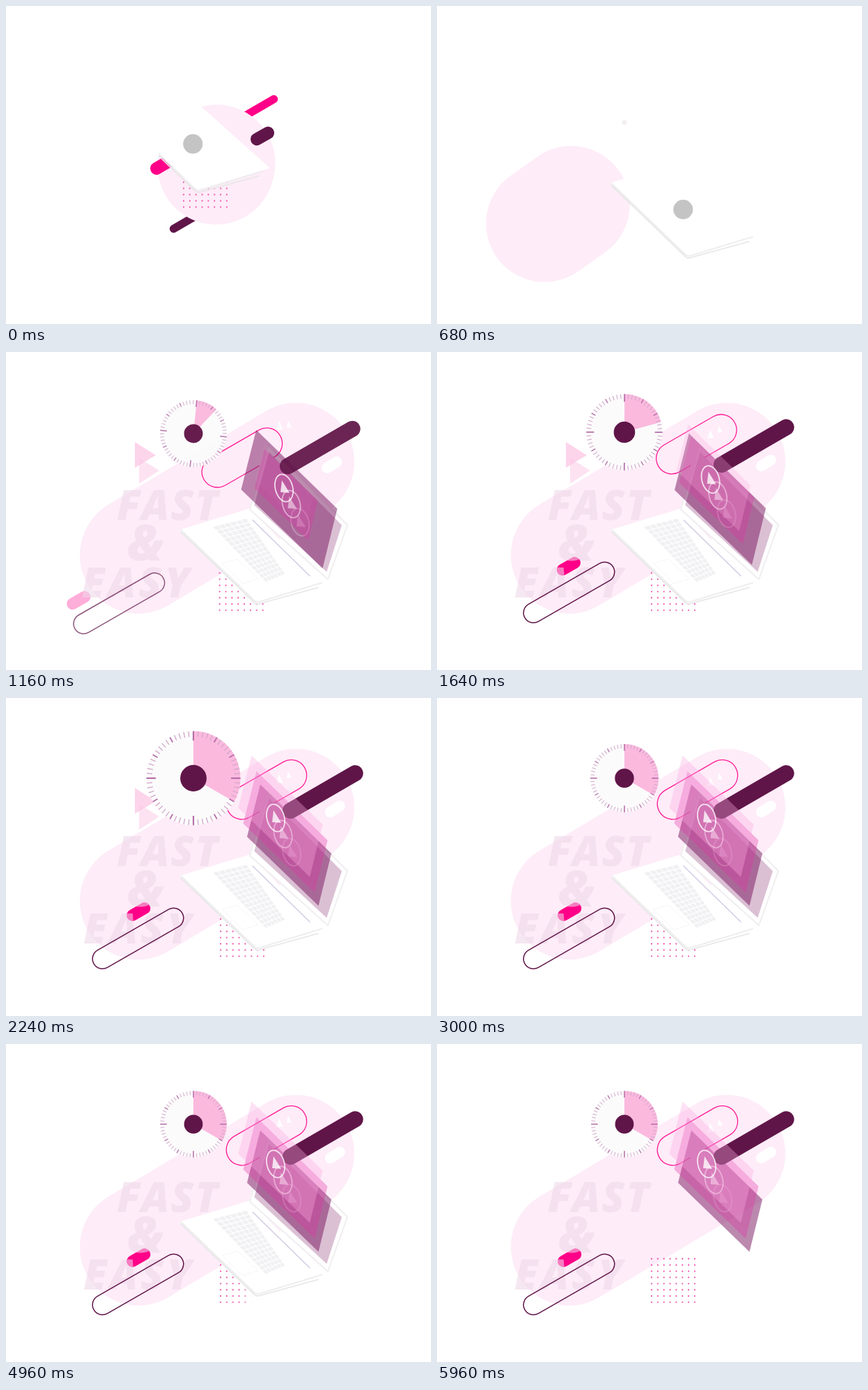
Recreate the animation shown at these times as an HTML page with a canvas. Size 610 by 456 pixels, loop 6000 ms.

```html
<!DOCTYPE html>
<html lang="en">
<head>
<meta charset="utf-8">
<title>Fast &amp; Easy</title>
<style>
  html, body { margin: 0; width: 100%; height: 100%; overflow: hidden; background: #fff; }
  canvas { display: block; width: 610px; height: 456px; }
</style>
</head>
<body>
<canvas id="stage"></canvas>
<script>
const LOOP = 6000, W = 610, H = 456;
const PALE = '#feecf8', PINK = '#ff0088', PLUM = '#601548';
const canvas = document.getElementById('stage');
const ctx = canvas.getContext('2d');
const dpr = window.devicePixelRatio || 1;
canvas.width = W * dpr;
canvas.height = H * dpr;

const clamp = x => Math.max(0, Math.min(1, x));
const mix = (a, b, u) => a + (b - a) * u;
const mixPt = (p, q, u) => [mix(p[0], q[0], u), mix(p[1], q[1], u)];
const span = (t, a, b) => clamp((t - a) / (b - a));
const easeOut = u => 1 - (1 - u) ** 3;
const easeInOut = u => u < .5 ? 4 * u ** 3 : 1 - (2 - 2 * u) ** 3 / 2;
const smooth = u => u * u * (3 - 2 * u);

// Smooth value through [time, value] stops
function track(t, stops) {
  if (t <= stops[0][0]) return stops[0][1];
  for (let i = 1; i < stops.length; i++) {
    const [a, from] = stops[i - 1], [b, to] = stops[i];
    if (t <= b) return mix(from, to, smooth(span(t, a, b)));
  }
  return stops[stops.length - 1][1];
}

// Draws with its own opacity and offset
function group(alpha, dx, dy, draw) {
  if (alpha <= 0) return;
  ctx.save();
  ctx.globalAlpha *= alpha;
  ctx.translate(dx, dy);
  draw();
  ctx.restore();
}

// Group shifted along the 30 degree axis; positive is down and left
const slide = (alpha, d, draw) => group(alpha, -d, d * .577, draw);

function bar(p, q, r, color) {
  ctx.lineCap = 'round';
  ctx.lineWidth = 2 * r;
  ctx.strokeStyle = color;
  ctx.beginPath();
  ctx.moveTo(...p);
  ctx.lineTo(...q);
  ctx.stroke();
}

function capsule(p, q, r, color, width) {
  const a = Math.atan2(q[1] - p[1], q[0] - p[0]);
  ctx.beginPath();
  ctx.arc(...p, r, a + Math.PI / 2, a - Math.PI / 2);
  ctx.arc(...q, r, a - Math.PI / 2, a + Math.PI / 2);
  ctx.closePath();
  ctx.strokeStyle = color;
  ctx.lineWidth = width;
  ctx.stroke();
}

function poly(points, fill, stroke, width = 1) {
  ctx.beginPath();
  points.forEach(p => ctx.lineTo(...p));
  ctx.closePath();
  if (fill) { ctx.fillStyle = fill; ctx.fill(); }
  if (stroke) {
    ctx.lineJoin = 'round';
    ctx.strokeStyle = stroke;
    ctx.lineWidth = width;
    ctx.stroke();
  }
}

function disc(x, y, r, color) {
  ctx.fillStyle = color;
  ctx.beginPath();
  ctx.arc(x, y, r, 0, 2 * Math.PI);
  ctx.fill();
}

function dots(alphaAt) {
  for (let row = 0; row < 8; row++)
    for (let col = 0; col < 8; col++)
      group(alphaAt(col, row), 0, 0, () =>
        disc(308 + col * 8.85, 308 + row * 8.9, 1.15, '#f05cae'));
}

function base() {
  const corners = [[251, 256], [350, 226], [453, 335], [360, 360]];
  poly(corners, '#fff', '#fff', 3);
  edge();
  const keyAt = (u, v) => mixPt(mixPt([345, 239], [401, 319], u), mixPt([296, 251], [373, 331], u), v);
  for (let r = 0; r < 6; r++)
    for (let c = 0; c < 14; c++) {
      const u = c / 14, v = r / 6, du = .058, dv = .14;
      poly([keyAt(u, v), keyAt(u + du, v), keyAt(u + du, v + dv), keyAt(u, v + dv)], '#f1f0f2');
    }
  poly([[310, 303], [332, 297], [362, 325], [340, 332]], null, '#f6f6f6');
  bar([354, 241], [436, 321], .6, '#cfc6e2');
}

function edge() {
  ctx.lineCap = ctx.lineJoin = 'round';
  for (const [y, color, w] of [[0, '#eeeeee', 2], [2.8, '#e6e6e6', 1.6]]) {
    ctx.strokeStyle = color;
    ctx.lineWidth = w;
    ctx.beginPath();
    ctx.moveTo(251, 255 + y);
    ctx.lineTo(356, 356 + y);
    ctx.quadraticCurveTo(360, 360 + y, 366, 357.5 + y);
    ctx.lineTo(y ? 448 : 453, y ? 335 + y : 331);
    ctx.stroke();
  }
}

// Lid swings about the hinge; open runs from 0 to 1
function lid(open) {
  const a = open * Math.PI / 2, c = Math.cos(a), s = Math.sin(a);
  const swing = ([x, y], [cx, cy], [ox, oy]) => [x + c * cx + s * ox, y + c * cy + s * oy];
  const far = swing([350, 226], [-99, 28], [26, -93]);
  const near = swing([460, 328], [-100, 29], [30, -80]);
  poly([[350, 226], far, near, [462, 326]], '#fff', '#fff', 2);
  if (open > 0) poly([[350, 226], far, near, [462, 326]], null, '#f0eef0', 2);
  if (open < .6) {
    const mid = mixPt(mixPt([350, 226], [460, 328], .5), mixPt(far, near, .5), .52);
    group(1 - open / .6, 0, 0, () => disc(mid[0], mid[1], 14, '#c4c4c4'));
  } else {
    const at = (u, v) => mixPt(mixPt([353, 222], [461, 321], u), mixPt(far, near, u), v);
    group(span(open, .6, 1), 0, 0, () =>
      poly([at(.02, .05), at(.98, .05), at(.95, .92), at(.03, .92)], 'rgba(150,70,130,.34)'));
  }
}

function clock(x, y, r, turn, sweep) {
  ctx.save();
  ctx.translate(x, y);
  ctx.rotate(turn);
  disc(0, 0, r, '#fbfbfb');
  ctx.fillStyle = '#fbb9de';
  ctx.beginPath();
  ctx.moveTo(0, 0);
  ctx.arc(0, 0, r, -Math.PI / 2, -Math.PI / 2 + sweep);
  ctx.fill();
  ctx.lineCap = 'butt';
  for (let i = 0; i < 60; i++) {
    const quarter = i % 15 === 0, five = i % 5 === 0;
    ctx.strokeStyle = five ? '#b56ea8' : '#d3a9cc';
    ctx.lineWidth = r * (quarter ? .032 : five ? .026 : .02);
    ctx.beginPath();
    ctx.moveTo(0, -r);
    ctx.lineTo(0, -r * (quarter ? .8 : .88));
    ctx.stroke();
    ctx.rotate(Math.PI / 30);
  }
  disc(0, 0, r * .28, PLUM);
  ctx.restore();
}

// Skewed pane around its centre
function pane(x, y, scale, alpha, color) {
  group(alpha, x, y, () => {
    ctx.scale(scale, scale);
    poly([[-60.5, -12], [-41.5, -87], [60.5, 12], [42, 87]], color);
  });
}

function playIcon(x, y, alpha) {
  group(alpha, x, y, () => {
    ctx.strokeStyle = '#fff';
    ctx.lineWidth = 1.8;
    ctx.beginPath();
    ctx.ellipse(0, 0, 12.5, 20, -.25, 0, 2 * Math.PI);
    ctx.stroke();
    poly([[-3, -11], [8, 7], [-5, 6]], '#fff');
  });
}

function words(t) {
  const alpha = span(t, 780, 1080);
  group(alpha, 0, 0, () => {
    ctx.fillStyle = 'rgba(238,215,232,.58)';
    const line = (text, x, y, size, spacing) => {
      ctx.font = `italic 800 ${size}px "Open Sans", "Noto Sans", sans-serif`;
      ctx.letterSpacing = spacing + 'px';
      ctx.fillText(text, x, y);
    };
    line('FAST', 159, 241, 60, 2);
    line('&', 175, 299, 70, 0);
    line('EASY', 111 - 6 * (1 - easeOut(span(t, 1000, 1700))), 352, 60, 4);
  });
}

function intro(t) {
  const u = easeInOut(span(t, 0, 560));
  const away = 193 * u, alpha = 1 - span(t, 300, 540);
  slide(alpha, away, () => {
    bar([325, 168], [384.5, 133.5], 5.7, PINK);
    bar([240.5, 319.5], [275, 299.5], 5.7, PLUM);
  });
  bar(mixPt([301.5, 229.5], [149, 315], u), mixPt([302.5, 225.5], [159, 304], u), 84, PALE);
  slide(alpha, away, () => {
    bar([360, 191], [376, 182], 9, PLUM);
    bar([216, 233], [240, 219], 9, PINK);
  });
  group(1 - span(t, 250, 540), mix(-53, 0, u), mix(-82, 0, u), () => dots(() => 1));
  group(1, mix(-85, 0, u), mix(-94, 0, u), () => {
    ctx.beginPath();
    ctx.rect(mix(304, 248, u), 0, W, H);
    ctx.clip();
    lid(0);
    edge();
  });
}

function dotAlpha(t, col, row) {
  const gone = span(t, 3380 + 150 * row, 3560 + 150 * row);
  const back = span(t, 4400 + 110 * col, 4560 + 110 * col);
  return span(t, 850, 1100) * Math.max(1 - gone, back);
}

function pinkOutline(t) {
  ctx.save();
  ctx.beginPath();
  ctx.rect(0, 0, W, H);
  ctx.rect(364, 147, 20, 20);
  ctx.clip('evenodd');
  slide(span(t, 720, 1050), 150 * (1 - easeOut(span(t, 700, 1900))), () =>
    capsule([338.5, 151.7], [409.3, 111], 22.3, '#ff1a96', 1.3));
  ctx.restore();
}

function main(t) {
  const grow = easeOut(span(t, 660, 1120));
  bar(mixPt([149, 315], [190, 291], grow), mixPt([159, 304], [416, 157], grow), 84, PALE);

  group(span(t, 850, 1120) * (1 - span(t, 2580, 3000)), 0, 0, () => {
    poly([[185, 129], [215, 148], [185, 166]], 'rgba(252,185,222,.6)');
    poly([[191, 152], [220, 170], [191, 189]], 'rgba(252,200,230,.5)');
  });

  slide(track(t, [[1000, 0], [1180, .33], [1600, 1]]), 240 * (1 - easeOut(span(t, 900, 1800))), () =>
    bar([181.5, 311.5], [199, 301.5], 8.4, PINK));
  words(t);
  slide(span(t, 680, 760) * track(t, [[1100, .7], [1500, 1]]), 250 * (1 - easeOut(span(t, 680, 1600))), () =>
    capsule([138.5, 374], [240.5, 315.5], 14.3, PLUM, 1.5));

  group(1, -2 * (1 - span(t, 1000, 1500)), 0, () => dots((c, r) => dotAlpha(t, c, r)));

  if (t < 5960) {
    const open = smooth(span(t, 690, 1080));
    if (open > 0) base();
    lid(open);
    if (open < .5) edge();
  }

  slide(span(t, 850, 1050), 60 * (1 - easeOut(span(t, 700, 1500))), () =>
    bar([465.5, 163.5], [479, 155], 7.8, '#fff'));
  const bob = track(t, [[1100, -15], [1700, -2], [2240, -4], [3000, 0], [3920, -7], [4500, -14], [5200, -4], [5760, 0]]);
  group(span(t, 900, 1100) * .9, 0, 0, () => {
    poly([[392, 113 + bob], [397.5, 125.5 + bob], [388, 126.5 + bob]], '#fff');
    poly([[405, 107 + bob * .6], [410, 117 + bob * .6], [402.5, 117 + bob * .6]], '#fff');
  });

  pinkOutline(t);

  const rise = easeOut(span(t, 660, 1160));
  const r = track(t, [[660, 12], [1130, 48], [1280, 48], [2200, 67.5], [2560, 67.5], [3000, 49], [3200, 47.8]]);
  group(span(t, 640, 1180), 0, 0, () => clock(
    269, mix(174, 117, rise) - 2 * span(t, 1160, 1500), r,
    track(t, [[680, .5], [1160, .1], [1700, 0]]),
    track(t, [[800, 0], [1160, .66], [2200, 2 * Math.PI / 3]])));

  const lift = 1 - smooth(span(t, 1140, 2100)), dx = 12 * lift, dy = 23 * lift;
  pane(406.5, 211, track(t, [[800, .9], [1100, 1.14], [1320, 1.14], [2050, 1]]),
    span(t, 900, 1130), 'rgba(120,20,95,.5)');
  playIcon(410 + dx, 221 + dy, .28 * span(t, 950, 1150));

  pane(401 + dx * .1, 192 + dy * .56, track(t, [[950, .6], [1160, .75], [2050, 1]]),
    span(t, 950, 1180), 'rgba(222,50,165,.34)');
  playIcon(397.5 + dx, 195 + dy, .5 * span(t, 950, 1150));

  slide(span(t, 820, 1000) * track(t, [[1100, .92], [1400, 1]]), 62 * (1 - easeOut(span(t, 760, 1430))), () =>
    bar([408.5, 161.5], [501, 108], 11.6, PLUM));

  pane(394 + dx * .5, 169.5 + dy, track(t, [[1050, .7], [2100, 1]]),
    span(t, 1080, 1800), 'rgba(250,170,222,.35)');
  playIcon(387 + dx, 172 + dy, .78 * span(t, 950, 1150));
}

function render(t) {
  ctx.setTransform(dpr, 0, 0, dpr, 0, 0);
  ctx.globalAlpha = 1;
  ctx.fillStyle = '#fff';
  ctx.fillRect(0, 0, W, H);
  (t < 660 ? intro : main)(t);
}

const start = performance.now();
function tick() {
  render((performance.now() - start) % LOOP);
  requestAnimationFrame(tick);
}
tick();
</script>
</body>
</html>
```
